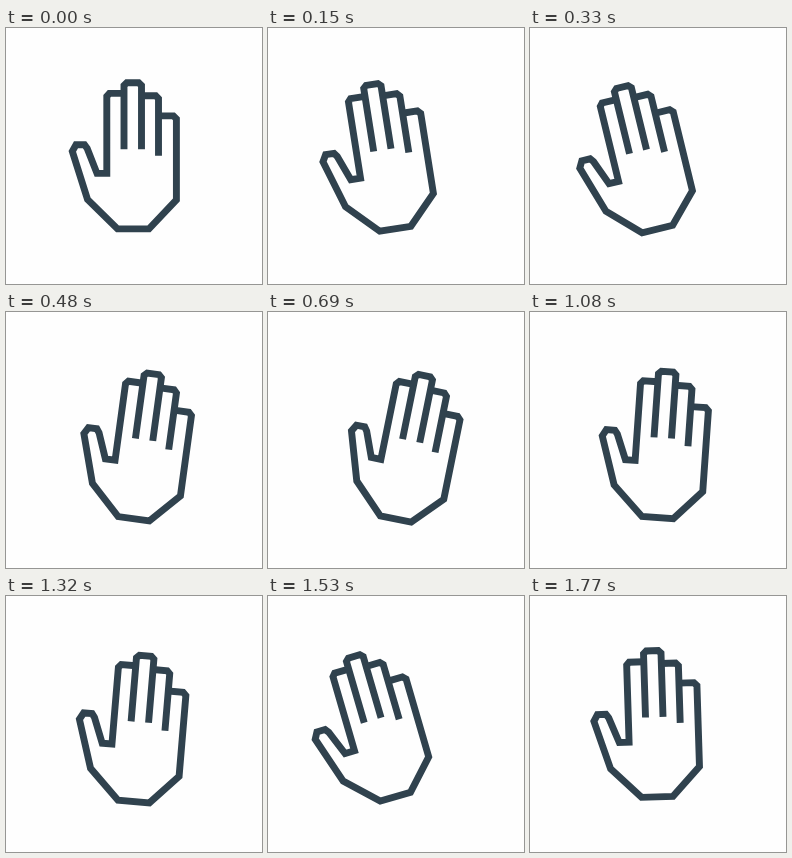
These frames come from a looping animation (256 by 256 pixels, 1.8 s). An HTML page:

```html
<!DOCTYPE html>
<html lang="en">
<head>
<meta charset="utf-8">
<title>Waving hand</title>
<style>
  html, body { margin: 0; width: 100%; height: 100%; overflow: hidden; background: #fefefe; }
  svg { display: block; width: 100vw; height: 100vh; }
  path { fill: none; stroke: #30424e; stroke-width: 6.9; stroke-linejoin: miter; }
</style>
</head>
<body>
<svg viewBox="0 0 256 256">
  <g id="hand">
    <path d="M118 65.4H103.4L100.8 68.4V145.4H91L81.2 120.4L78.5 116.8H70L66.3 123.4L81.5 171.4L111.5 200.9H143L170.4 171.9V90.9L167.4 87.9H152.5"/>
    <path d="M118 121.2V57.4L120.8 54.7H132.7L135.5 57.4V121.2"/>
    <path d="M135.5 67.7H149.7L152.5 70.6V127.7"/>
  </g>
</svg>
<script>
  const LOOP = 1800, STEP = 30, SWING = 300;
  const tilts = [0, -18, 25, -20, 20, -18, 0];
  const hand = document.getElementById('hand');

  function draw(time) {
    const t = Math.floor((time % LOOP) / STEP) * STEP;
    const i = Math.floor(t / SWING);
    const p = (t % SWING) / SWING;
    const from = tilts[i], to = tilts[i + 1];
    const angle = from + (to - from) * p;

    // The hand dips as it crosses over to the right.
    const right = to > from ? p : 1 - p;
    const reach = from * to < 0 ? Math.max(from, to) : 0;
    const drop = 0.24 * reach * Math.sin(Math.PI * 0.72 * right) ** 2;

    hand.setAttribute('transform',
      `translate(${drop * 0.1} ${drop}) rotate(${angle} 126.5 200.4)`);
  }

  const start = performance.now();
  function tick() {
    draw(performance.now() - start);
    requestAnimationFrame(tick);
  }
  tick();
</script>
</body>
</html>
```
